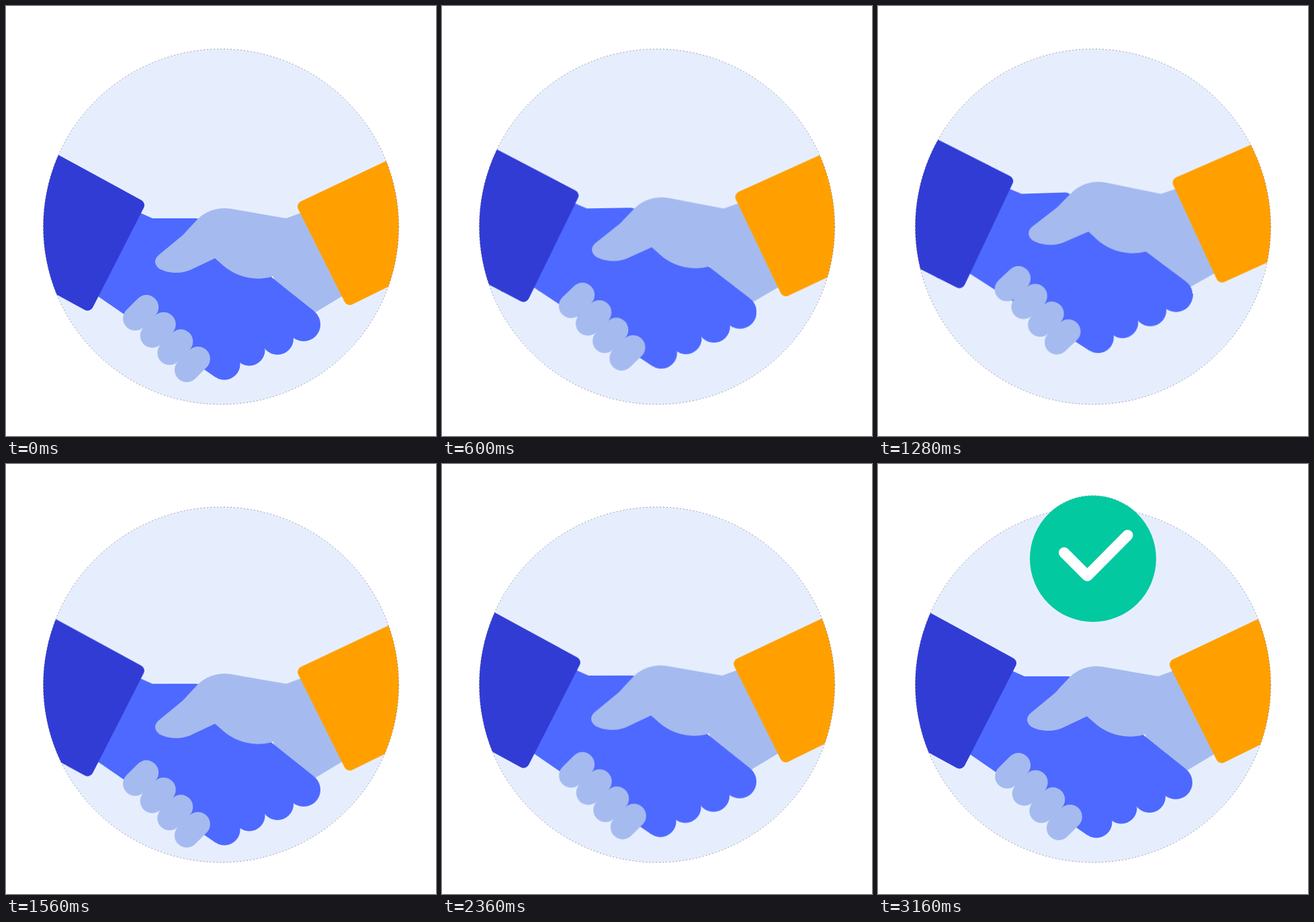
An HTML page for the animation above (4.24 s loop, 640 px wide and 640 px high).

```html
<!DOCTYPE html>
<html lang="en">
<head>
<meta charset="utf-8">
<title>Handshake</title>
<style>
  html, body { margin: 0; width: 100%; height: 100%; overflow: hidden; background: #fff; }
  svg { display: block; width: 100%; height: 100%; }

  .light { fill: #a5bbef; }
  .blue { fill: #4d69ff; }
  .sleeve { stroke-width: 17; stroke-linejoin: round; }
  .navy { fill: #313cd5; stroke: #313cd5; }
  .orange { fill: #ffa000; stroke: #ffa000; }
  .fingers { fill: none; stroke: #a5bbef; stroke-width: 36.2; stroke-linecap: round; }
  .rim { fill: none; stroke: #23283a; stroke-opacity: .55; stroke-width: .8; stroke-dasharray: 2 3; }
  .tick { fill: none; stroke: #fff; stroke-width: 16; stroke-linecap: round; stroke-linejoin: round; stroke-dasharray: 1 2; }

  .left, .right, .badge, .tick {
    animation: shake 4240ms cubic-bezier(.333, 0, .667, 1) infinite;
  }
  .left { --tilt: -2deg; transform-origin: 122px 450px; }
  .right { --tilt: 2deg; transform-origin: 512px 445px; }
  .badge { animation-name: grow; transform-origin: 320px 141px; }
  .tick { animation-name: draw; }

  /* Each half swing lasts 400 ms. */
  @keyframes shake {
    0%, 56.604%, 100% { transform: translateY(0) rotate(0deg); }
    9.434%, 28.302%, 47.17% { transform: translateY(-39px) rotate(var(--tilt)); }
    18.868%, 37.736% { transform: translateY(12.6px) rotate(0deg); }
  }
  @keyframes grow {
    0%, 56.604% { transform: scale(0); }
    67.925%, 100% { transform: scale(1); }
  }
  @keyframes draw {
    0%, 66.037% { stroke-dashoffset: 1; opacity: 0; }
    66.038% { stroke-dashoffset: 1; opacity: 1; }
    74.528%, 100% { stroke-dashoffset: 0; opacity: 1; }
  }
</style>
</head>
<body>
<svg viewBox="0 0 640 640">
  <defs>
    <clipPath id="disc"><circle cx="320" cy="328.5" r="264.5"/></clipPath>
  </defs>

  <circle class="rim badge" cx="320" cy="141" r="94"/>
  <circle cx="320" cy="328.5" r="264.5" fill="#e6eefe"/>

  <g clip-path="url(#disc)">
    <!-- wrist behind the blue hand -->
    <path class="light right" d="M380 340 417 316 455 302 515 423 462 455 440 468 400 410Z"/>

    <g class="left">
      <g class="blue">
        <path d="M180 299 218 316H283Q286 316 288 317.6L458.6 454.3 443 474 404 495 362 512 325 533 311.7 552.4 115 417Z"/>
        <circle cx="443" cy="474" r="25"/>
        <circle cx="404" cy="495" r="24"/>
        <circle cx="362" cy="512" r="23.5"/>
        <circle cx="325" cy="533" r="23.5"/>
      </g>
      <path class="sleeve navy" d="M4 191 197.5 296.5 121.5 445-71 340Z"/>
    </g>

    <g class="right">
      <path class="light" d="M286 316.5C297 306 311 301 325 301Q330 301 336 302L417 316 404 400 395 403C370 410 342 403 323 386L311 375.5 274 393C269 395 262 397 254 397C246 397 236 395.5 228 391C220 385 220 376 228 370L262 342Q266 338.5 270 333.5Z"/>
      <path class="fingers" d="M192.2 465 209 448.2M217.8 490.6 234.6 473.8M243.4 516.2 260.2 499.4M269 541.8 285.8 525"/>
      <path class="sleeve orange" d="M640 205 442.5 298.5 511.5 436.5 640 373.5Z"/>
    </g>
  </g>

  <circle class="rim" cx="320" cy="328.5" r="264.5"/>

  <g class="badge">
    <circle cx="320" cy="141" r="94" fill="#02c9a0"/>
    <path class="tick" pathLength="1" d="M277 132 311.5 166.5 371.5 106"/>
  </g>
</svg>
</body>
</html>
```
